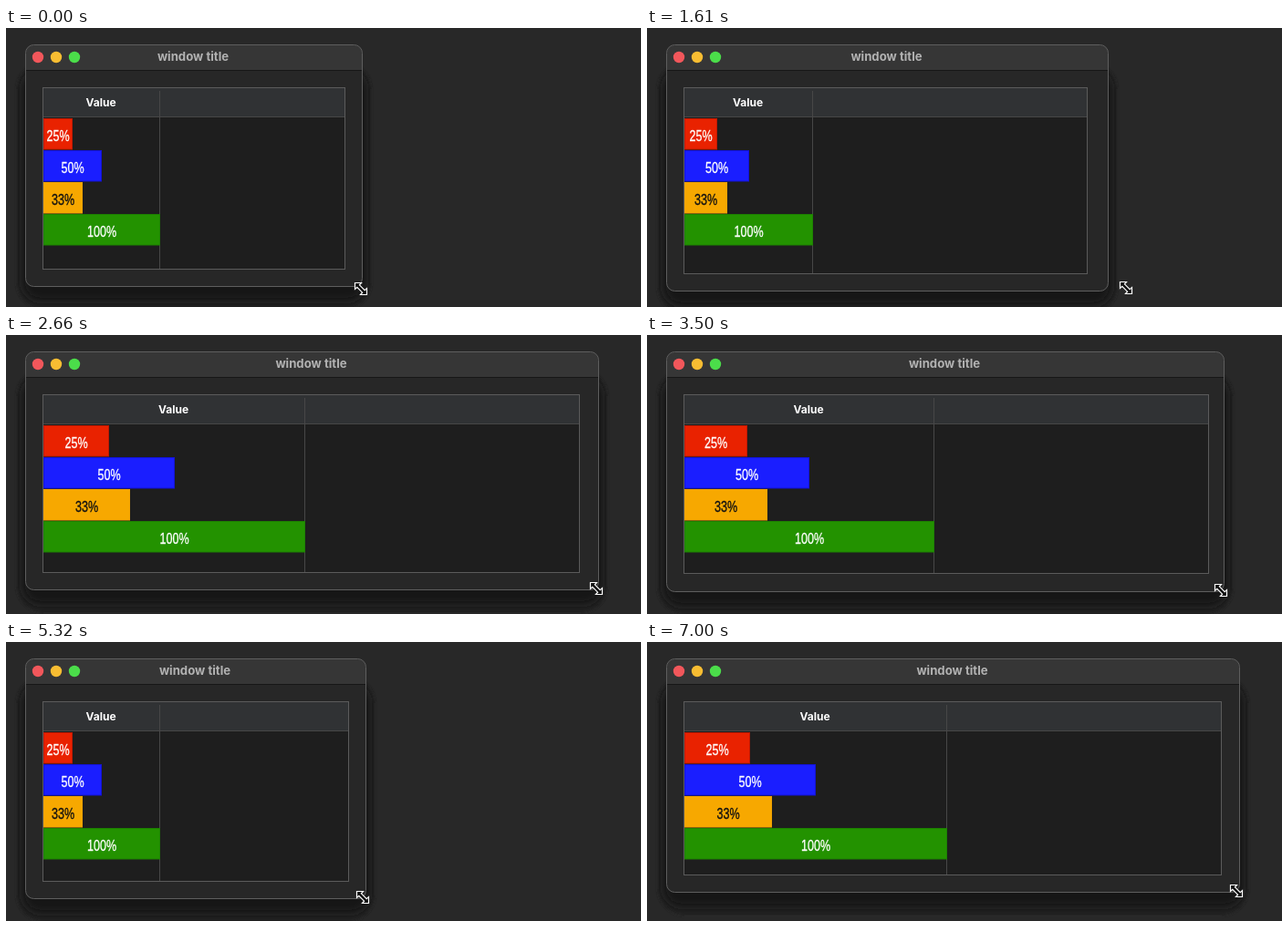
Write an HTML page that moves like this. It is 696 by 306 pixels and loops after 7.07 s.

```html
<!DOCTYPE html>
<html lang="en">
<head>
<meta charset="utf-8">
<title>Window resize</title>
<style>
  html, body { margin: 0; width: 100%; height: 100%; overflow: hidden; background: #282828; }
  svg { display: block; width: 696px; height: 306px; }
  text { text-anchor: middle; }
  .ui { font-family: Inter, sans-serif; font-weight: 700; }
  .cell { font: 16.5px "Liberation Sans", Arial, sans-serif; stroke-width: .35; }
</style>
</head>
<body>
<svg id="stage" viewBox="0 0 696 306">
  <defs>
    <filter id="soft" x="-10%" y="-10%" width="120%" height="120%"><feGaussianBlur stdDeviation="1.5"/></filter>
    <filter id="deep" x="-10%" y="-15%" width="120%" height="130%"><feGaussianBlur stdDeviation="5"/></filter>
  </defs>
</svg>
<script>
const svg = document.getElementById('stage');
const LOOP = 7070, STEP = 70, LEFT = 41, ROW = 35, LAG = 18;

const settle = p => Math.sin(p * Math.PI / 2);
const pull = p => p ** 1.15;

// each drag takes the window's bottom right corner to (x, y); sag bows its path
const HOME = { x: 390, y: 283 };
const DRAGS = [
  { from: 1050, to: 3060, x: 662, y: 277, sag: 8.1, ease: settle },
  { from: 3290, to: 4480, x: 438, y: 275, sag: 8.1, ease: pull },
  { from: 4480, to: 5600, x: 390, y: 282, sag: 0, ease: settle },
  { from: 5810, to: 6580, x: 629, y: 276, sag: 0, ease: pull },
  { from: 6580, to: 7050, x: 649, y: 274, sag: 0, ease: settle }
];
const BARS = [
  { share: 25, fill: '#e92200', edge: '#c01800', ink: '#fff' },
  { share: 50, fill: '#1a1eff', edge: '#1212d8', ink: '#fff' },
  { share: 33, fill: '#f7a800', edge: '#f0a200', ink: '#111' },
  { share: 100, fill: '#239200', edge: '#1d8200', ink: '#fff' }
];

function add(tag, attrs, label) {
  const el = document.createElementNS('http://www.w3.org/2000/svg', tag);
  set(el, attrs);
  if (label) el.textContent = label;
  return svg.appendChild(el);
}
function set(el, attrs) {
  for (const k in attrs) el.setAttribute(k, attrs[k]);
}

const halo = add('rect', { x: 12, y: 38, rx: 30, fill: '#222', filter: 'url(#soft)' });
const shade = add('rect', { x: 18, y: 46, rx: 20, fill: '#191919', filter: 'url(#deep)' });
const frame = add('rect', { x: 21.5, y: 18.5, rx: 9, fill: '#272727' });
const bar = add('path', { fill: '#363636' });
const barLine = add('path', { stroke: '#171717' });
const rim = add('rect', { x: 21.5, y: 18.5, rx: 9, fill: 'none', stroke: '#5e5e5e' });
['#f2575b', '#f8bd32', '#4bdd4a'].forEach((fill, i) => add('circle', { cx: 35 + 20 * i, cy: 32, r: 6.2, fill }));
const title = add('text', { class: 'ui', y: 36, 'font-size': 13.2, fill: '#b2b2b2' }, 'window title');

const table = add('rect', { x: 40.5, y: 65.5, fill: '#1e1e1e' });
const head = add('rect', { x: 41, y: 66, height: 31, fill: '#303234' });
const rules = add('path', { stroke: '#474747', fill: 'none' });
const border = add('rect', { x: 40.5, y: 65.5, fill: 'none', stroke: '#5b5b5b' });
const value = add('text', { class: 'ui', y: 85.5, 'font-size': 12, fill: '#fff' }, 'Value');

const cells = BARS.map(({ share, fill, edge, ink }, i) => ({
  share,
  y: 124 + ROW * i,
  box: add('rect', { x: 41.5, y: 99.5 + ROW * i, height: 33.5, fill, stroke: edge }),
  text: add('text', { class: 'cell', fill: ink, stroke: ink }, share + '%')
}));

const pointer = add('path', {
  d: 'M-6.5-6.5H.5L-1.6-4.2 4.2 1.6 6.5-.5V6.5H-.5L1.6 4.2-4.2-1.6-6.5.5Z',
  fill: '#111', stroke: '#fff', 'stroke-width': 1.2
});

function progress(drag, t) {
  const p = (t - drag.from) / (drag.to - drag.from);
  return drag.ease(Math.min(1, Math.max(0, p)));
}

function corner(t) {
  let { x, y } = HOME;
  for (const d of DRAGS) {
    const e = progress(d, t);
    x += (d.x - x) * e;
    y += (d.y - y) * e + d.sag * 4 * e * (1 - e);
  }
  return [Math.round(x), Math.round(y), x, y];
}

// the pointer wavers before the first drag and runs ahead of the window during it
function pointerAt(t, right, bottom) {
  const e = progress(DRAGS[0], t);
  const hop = Math.min(5, Math.floor((t + STEP) / (2 * STEP)));
  const waver = 4 * Math.sin(1.6 * hop) * (1 - hop / 5);
  const lead = 23 * Math.sin(Math.PI * e) ** 2;
  return [
    Math.round(right - 3 + 2 * (1 - e) + waver + lead),
    Math.round(bottom - 1 + 4 * (1 - e) + waver / 2 - lead / 5)
  ];
}

function draw(ms) {
  const t = Math.floor((ms % LOOP) / STEP) * STEP;
  const [right, bottom] = corner(t);
  const [, lateBottom, lateX] = corner(t - LAG);
  const edge = Math.round(lateX - 19.5);
  const low = lateBottom - 19;
  const split = Math.max(168, edge - 301);
  const col = split - LEFT + 1;

  set(halo, { width: right - 2, height: bottom - 12 });
  set(shade, { width: right - 14, height: bottom - 30 });
  for (const el of [frame, rim]) set(el, { width: right - 21, height: bottom - 18 });
  set(bar, { d: `M22 46V28Q22 19 31 19H${right - 9}Q${right} 19 ${right} 28V46Z` });
  set(barLine, { d: `M22 46.5H${right}` });
  set(title, { x: (right + 20) / 2 });

  for (const el of [table, border]) set(el, { width: edge - 40, height: low - 65 });
  set(head, { width: edge - LEFT });
  set(rules, { d: `M41 97.5H${edge}M${split + .5} 69V${low}` });
  set(value, { x: LEFT + col / 2 - 1 });

  for (const c of cells) {
    const w = Math.ceil(col * c.share / 100);
    set(c.box, { width: w - 1 });
    set(c.text, { transform: `translate(${LEFT + w / 2} ${c.y}) scale(.76 1)` });
  }
  set(pointer, { transform: `translate(${pointerAt(t, right, bottom)})` });
}

const start = performance.now();
function tick() {
  draw(performance.now() - start);
  requestAnimationFrame(tick);
}
tick();
</script>
</body>
</html>
```
